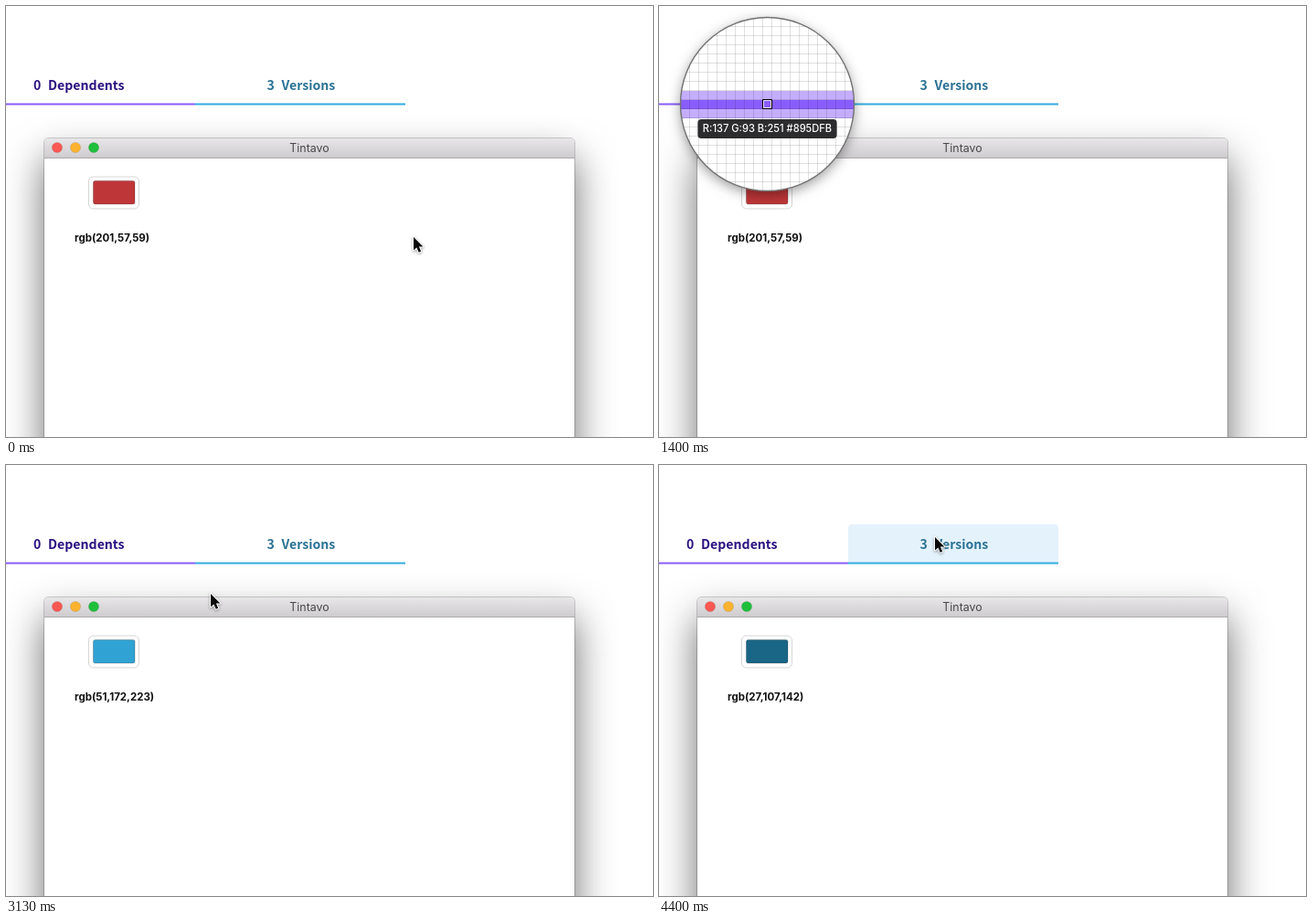
An HTML page with a canvas for the animation above (4470 ms loop, 708x472 px).

```html
<!DOCTYPE html>
<html lang="en">
<head>
<meta charset="utf-8">
<title>Colour picker</title>
<style>
html, body { margin: 0; width: 100%; height: 100%; overflow: hidden; background: #fff; }
canvas { display: block; }
</style>
</head>
<body>
<canvas id="stage" width="708" height="472"></canvas>
<script>
const stage = document.getElementById('stage');
const ctx = stage.getContext('2d');
const LOOP = 4470, TICKS = 67;
const TAB_FONT = 'bold 14.1px "Noto Sans CJK JP", "Noto Sans CJK SC", "Noto Sans CJK", "Noto Sans", sans-serif';
const UI = 'px Inter, "Liberation Sans", sans-serif';

// The loupe is up from open until done, then the swatch takes the colour.
const picks = [
  { open: -1, done: -1, rgb: '201,57,59' },
  { open: 10, done: 22, rgb: '137,93,251' },
  { open: 36, done: 45, rgb: '51,172,223' },
  { open: 56, done: 64, rgb: '27,107,142' }
];
const swatch = [122, 206];
// Pointer stops: tick, x, y
const stops = [
  [1, 446, 253], [9, ...swatch], [17, 127, 143], [21, 118, 107], [27, 118, 103],
  [28, 130, 111], [35, ...swatch], [38, 200, 159], [42, 222, 107], [46, 222, 105],
  [47, 224, 141], [51, ...swatch], [55, ...swatch], [59, 280, 88], [63, 302, 82], [66, 302, 79]
];
const tabs = [
  { x: 0, w: 207, line: '#895dfb', ink: '#2b1181', hover: '#efeafe', count: '0', name: 'Dependents', tx: 30 },
  { x: 207, w: 230, line: '#33acdf', ink: '#2a7295', hover: '#e4f2fc', count: '3', name: 'Versions', tx: 285.5 }
];

function pointerAt(n) {
  const i = Math.max(1, stops.findIndex(s => s[0] >= n));
  const a = stops[i - 1], b = stops[i];
  const f = Math.max(0, (n - a[0]) / (b[0] - a[0]));
  const ease = f * f * (3 - 2 * f);
  return [1, 2].map(k => Math.round(a[k] + (b[k] - a[k]) * ease));
}

function text(str, x, y, font, color, align = 'left') {
  ctx.font = font;
  ctx.fillStyle = color;
  ctx.textAlign = align;
  ctx.fillText(str, x, y);
}

function paint(fill, stroke, width = 1) {
  if (fill) { ctx.fillStyle = fill; ctx.fill(); }
  if (stroke) { ctx.strokeStyle = stroke; ctx.lineWidth = width; ctx.stroke(); }
}

function box(x, y, w, h, r, fill, stroke) {
  ctx.beginPath();
  ctx.roundRect(x, y, w, h, r);
  paint(fill, stroke);
}

function disc(x, y, r, fill, stroke, width) {
  ctx.beginPath();
  ctx.arc(x, y, r, 0, Math.PI * 2);
  paint(fill, stroke, width);
}

function withShadow(color, blur, dy, drawShape) {
  ctx.save();
  ctx.shadowColor = color;
  ctx.shadowBlur = blur;
  ctx.shadowOffsetY = dy;
  drawShape();
  ctx.restore();
}

function drawTabs(x, y, awake) {
  for (const t of tabs) {
    const over = x >= t.x && x < t.x + t.w && y >= 65 && y < 109;
    if (awake && over) box(t.x, 65, t.w, 43, [4, 4, 0, 0], t.hover);
    box(t.x, 106.5, t.w, 2, 0, t.line);
    text(t.count, t.tx, 92, TAB_FONT, t.ink);
    text(t.name, t.tx + 16, 92, TAB_FONT, t.ink);
  }
}

function drawWindow(rgb) {
  const top = [5, 5, 0, 0];
  withShadow('rgba(0,0,0,.58)', 43, 22, () => box(42, 145, 580, 440, top, '#fff'));
  box(41.5, 144.5, 581, 441, top, null, 'rgba(0,0,0,.18)');

  const bar = ctx.createLinearGradient(0, 145, 0, 166);
  bar.addColorStop(0, '#e8e6e8');
  bar.addColorStop(1, '#ceccce');
  box(42, 145, 580, 21, top, bar);
  box(42, 166, 580, 1, 0, '#aeaaab');
  ['#fc5753', '#fdb32f', '#1fbf3c'].forEach((color, i) =>
    disc(56 + 20 * i, 155, 5.6, color, 'rgba(0,0,0,.1)'));
  text('Tintavo', 332, 160, '12.4' + UI, '#49474a', 'center');

  box(90.5, 187, 55, 35, 5, '#fff', '#d6d6d6');
  box(95.5, 191.5, 45.5, 25.5, 2, `rgb(${rgb})`);
  box(95.5, 191.5, 45.5, 25.5, 2, 'rgba(0,0,0,.05)', 'rgba(0,0,0,.22)');
  text(`rgb(${rgb})`, 75, 257.5, 'bold 11.5' + UI, '#111');
}

// Magnifies the pixels around (x, y) ten times.
function drawLoupe(x, y) {
  const cx = x + 0.5, cy = y + 0.5, R = 95;
  const lens = document.createElement('canvas');
  lens.width = lens.height = 21;
  const lensCtx = lens.getContext('2d');
  lensCtx.drawImage(stage, x - 10, y - 10, 21, 21, 0, 0, 21, 21);
  const [r, g, b] = lensCtx.getImageData(10, 10, 1, 1).data;

  withShadow('rgba(0,0,0,.4)', 14, 4, () => disc(cx, cy, R, '#fff'));
  ctx.save();
  disc(cx, cy, R);
  ctx.clip();
  ctx.imageSmoothingEnabled = false;
  ctx.drawImage(lens, cx - 105, cy - 105, 210, 210);
  ctx.beginPath();
  for (let d = -R; d <= R; d += 10) {
    ctx.moveTo(cx + d, cy - R);
    ctx.lineTo(cx + d, cy + R);
    ctx.moveTo(cx - R, cy + d);
    ctx.lineTo(cx + R, cy + d);
  }
  paint(null, 'rgba(0,0,0,.12)');
  ctx.restore();

  disc(cx, cy, R, null, '#737373', 1.4);
  box(cx - 4, cy - 4, 8, 8, 0, null, 'rgba(255,255,255,.8)');
  box(cx - 5, cy - 5, 10, 10, 0, null, '#000');

  const hex = [r, g, b].map(v => v.toString(16).padStart(2, '0')).join('').toUpperCase();
  const label = `R:${r} G:${g} B:${b} #${hex}`;
  const font = '500 11.1' + UI;
  ctx.font = font;
  const w = ctx.measureText(label).width + 11;
  box(cx - w / 2, y + 17, w, 21, 4, 'rgba(28,28,30,.92)');
  text(label, cx, y + 31, font, '#fff', 'center');
}

function drawCursor(x, y) {
  const arrow = new Path2D('M0 0V14.5L3.4 11.4L5.7 16.8L8.2 15.7L5.9 10.5H10.4Z');
  ctx.save();
  ctx.translate(x, y);
  ctx.lineJoin = 'round';
  ctx.lineWidth = 2;
  ctx.strokeStyle = '#fff';
  withShadow('rgba(0,0,0,.4)', 3, 1, () => ctx.stroke(arrow));
  ctx.fillStyle = '#0a0a0a';
  ctx.fill(arrow);
  ctx.restore();
}

function draw(n) {
  const [x, y] = pointerAt(n);
  const last = picks.filter(p => p.done <= n).pop();
  const picking = picks.some(p => p.open <= n && n < p.done);
  const awake = !picking && n >= last.done + 2;   // hover wakes shortly after a pick

  ctx.fillStyle = '#fff';
  ctx.fillRect(0, 0, 708, 472);
  drawWindow(last.rgb);
  drawTabs(x, y, awake);
  (picking ? drawLoupe : drawCursor)(x, y);
}

// The picture advances 15 times a second.
let shown = -1;
function frame() {
  const t = performance.now() % LOOP;
  const n = Math.min(TICKS - 1, Math.floor((t + 5) * 0.015));
  if (n !== shown) draw(shown = n);
  requestAnimationFrame(frame);
}
frame();
</script>
</body>
</html>
```
